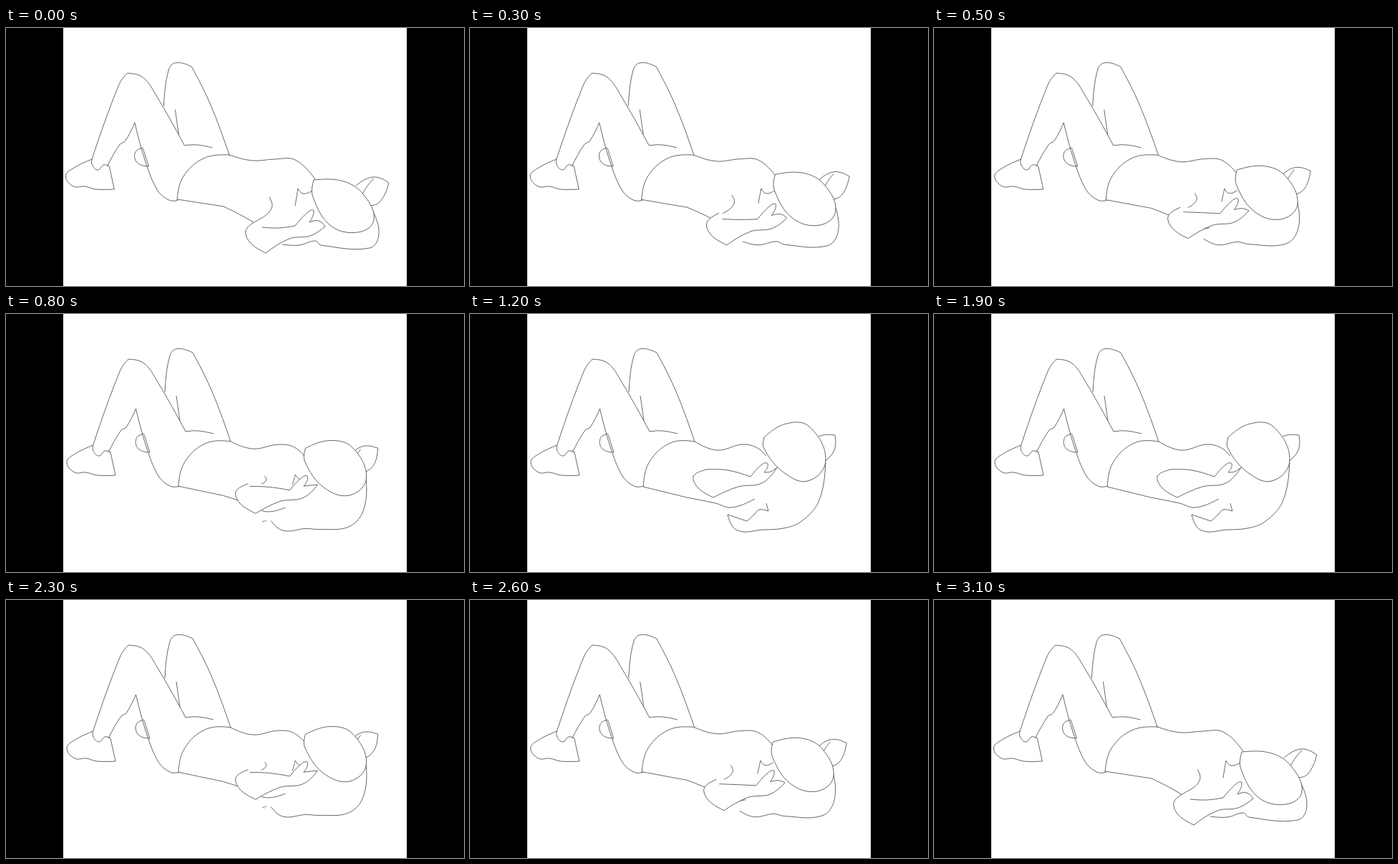
Animation of 640 by 360 pixels, one loop 3250 ms. Source, as an HTML page:

```html
<!DOCTYPE html>
<html lang="en">
<head>
<meta charset="utf-8">
<title>Crunch</title>
<style>
  html, body { margin: 0; width: 100%; height: 100%; overflow: hidden; background: #000; }
  svg { display: block; width: 100vw; height: 100vh; }
  path { fill: none; stroke: #555; stroke-width: .9; }
  path.solid { fill: #fff; }
</style>
</head>
<body>
<svg viewBox="0 0 640 360">
  <rect x="80" width="480" height="360" fill="#fff"/>
  <path id="legs"/>
</svg>
<script>
// Key points "x,y" joined by a smooth curve; "!" marks a sharp corner.
const LEGS = [
  // shoe, shin, near thigh and crease
  '122,183 95,196 85,207 96,221 112,221 127,225 153,225! 146,193! 138,191 130,198 122,191 122,182 159.5,79 171,63! 193,69 212,95 251,164! 268,163 290,167',
  // calf and underside of the thigh
  '143,193 161,162 168,158 181.5,132! 196,185 213,226 229,240 242,240.5',
  // far foot
  '193,167 182,174 185,188 201,193! 193,168',
  // far leg
  '222,109 229,58 239,48.5 261,54! 287,106 314,178',
  '238,114 243,149',
];

// Strokes from back to front, lying and raised; solid ones hide what lies behind.
const BODY = [
  { name: 'waist',
    down: '239,240 248,207 276,182 312,177',
    up: '242,241 251,206 280,180 314,178' },
  { name: 'chest',
    down: '312,177 344,185 376,183 404,184 432,211',
    up: '314,178 346,190 380,182 400,186 414,198' },
  { name: 'back',
    down: '239,239 304,249 347,272 360,285 378,290',
    up: '242,241 303,256! 343,264 365,270 398,258' },
  { name: 'shoulder',
    down: '368,236 371,252 352,268',
    up: '357,220 359,219 360,218' },
  { name: 'neck',
    down: '404,248 408,224 415,231 428,227',
    up: '398,232 402,224! 408,230 416,226' },
  { name: 'far arm',
    down: '512,254 521,288 508,307 440,303 432,297 410,303 386,302',
    up: '497,207 487,262 462,290 438,299 410,301 374,302 360,280' },
  { name: 'far hand', ease: 6,
    down: '358,290',
    up: '360,280 387,289! 398,279 404,273 417,275! 414,264' },
  { name: 'near arm', solid: true,
    down: '352,268 335,288 363,314 396,294 425,290 446,277 437,269 424,271 430,255 423,256 404,276 381,279 358,278',
    up: '330,217 312,231 340,256! 375,241 408,236 429,214! 420,220 411,221! 416,209 408,210 392,227! 360,218 330,217' },
  { name: 'hair',
    down: '489,220 513,208 535,216 522,243 505,248',
    up: '480,178 491,169.5 510,169! 509,190 495,206' },
  { name: 'hair fold',
    down: '514,210 506,219 498,232',
    up: '484,175 482,180 480,185' },
  { name: 'head', solid: true,
    down: '430,212 472,214 500,233 514,268 492,285 454,276 429,236 430,212',
    up: '411,172 442,153 474,157 497,204 472,233 437,220 411,188 411,172' },
];

const LAST = 31;      // the motion runs up and back in 32 ticks
const RAISED = 12;    // tick of the raised pose; a slight turn follows
const mix = (a, b, t) => a + (b - a) * t;
const blend = (p, q, t) => [mix(p[0], q[0], t), mix(p[1], q[1], t)];
const clamp = v => Math.max(0, Math.min(1, v));

const parse = text => text.split(' ').map(p => p.replace('!', '').split(',').map(Number));
const cornersOf = text => text.split(' ').map(p => p.endsWith('!'));

// Control point beside pts[i], along the line between its neighbours.
function handle(pts, i, reach) {
  const [px, py] = pts[i - 1], [nx, ny] = pts[i + 1];
  const span = Math.hypot(nx - px, ny - py) || 1;
  return [pts[i][0] + (nx - px) / span * reach, pts[i][1] + (ny - py) / span * reach];
}

function curve(pts, corners) {
  const sharp = i => corners[i] || i === 0 || i === pts.length - 1;
  let d = 'M' + pts[0];
  for (let i = 0; i + 1 < pts.length; i++) {
    const a = pts[i], b = pts[i + 1];
    const reach = Math.hypot(b[0] - a[0], b[1] - a[1]) * 0.36;
    let c1 = sharp(i) ? null : handle(pts, i, reach);
    let c2 = sharp(i + 1) ? null : handle(pts, i + 1, -reach);
    c1 ??= blend(a, c2 ?? b, 0.5);
    c2 ??= blend(b, c1, 0.5);
    d += `C${c1} ${c2} ${b}`;
  }
  return d;
}

// Turn about the waist that leaves the hips and the far elbow in place.
function turn([x, y], angle) {
  const w = angle * clamp((x - 312) / 60) * clamp((300 - y) / 100);
  return [x + (y - 240) * w, y - (x - 310) * w];
}

const legs = document.getElementById('legs');
legs.setAttribute('d', LEGS.map(s => curve(parse(s), cornersOf(s))).join(''));

const strokes = BODY.map(({ down, up, ease = 1.2, solid }) => {
  const path = document.createElementNS('http://www.w3.org/2000/svg', 'path');
  if (solid) path.classList.add('solid');
  legs.parentNode.append(path);
  return { path, ease, down: parse(down), up: parse(up), corners: cornersOf(up) };
});

function draw(now) {
  const tick = Math.min(LAST, Math.floor(now % 3250 / 100));
  const step = Math.min(tick, LAST - tick);
  const rise = clamp(step / RAISED);
  const angle = 0.027 * Math.max(0, step - RAISED);

  legs.setAttribute('transform', `translate(${-1.6 * (1 - clamp(step / 6))} 0)`);
  for (const { path, ease, down, up, corners } of strokes) {
    const pts = up.map((p, i) => turn(blend(down[i] ?? down[0], p, rise ** ease), angle));
    path.setAttribute('d', curve(pts, corners));
  }
  requestAnimationFrame(() => draw(performance.now() - start));
}

const start = performance.now();
draw(0);
</script>
</body>
</html>
```
